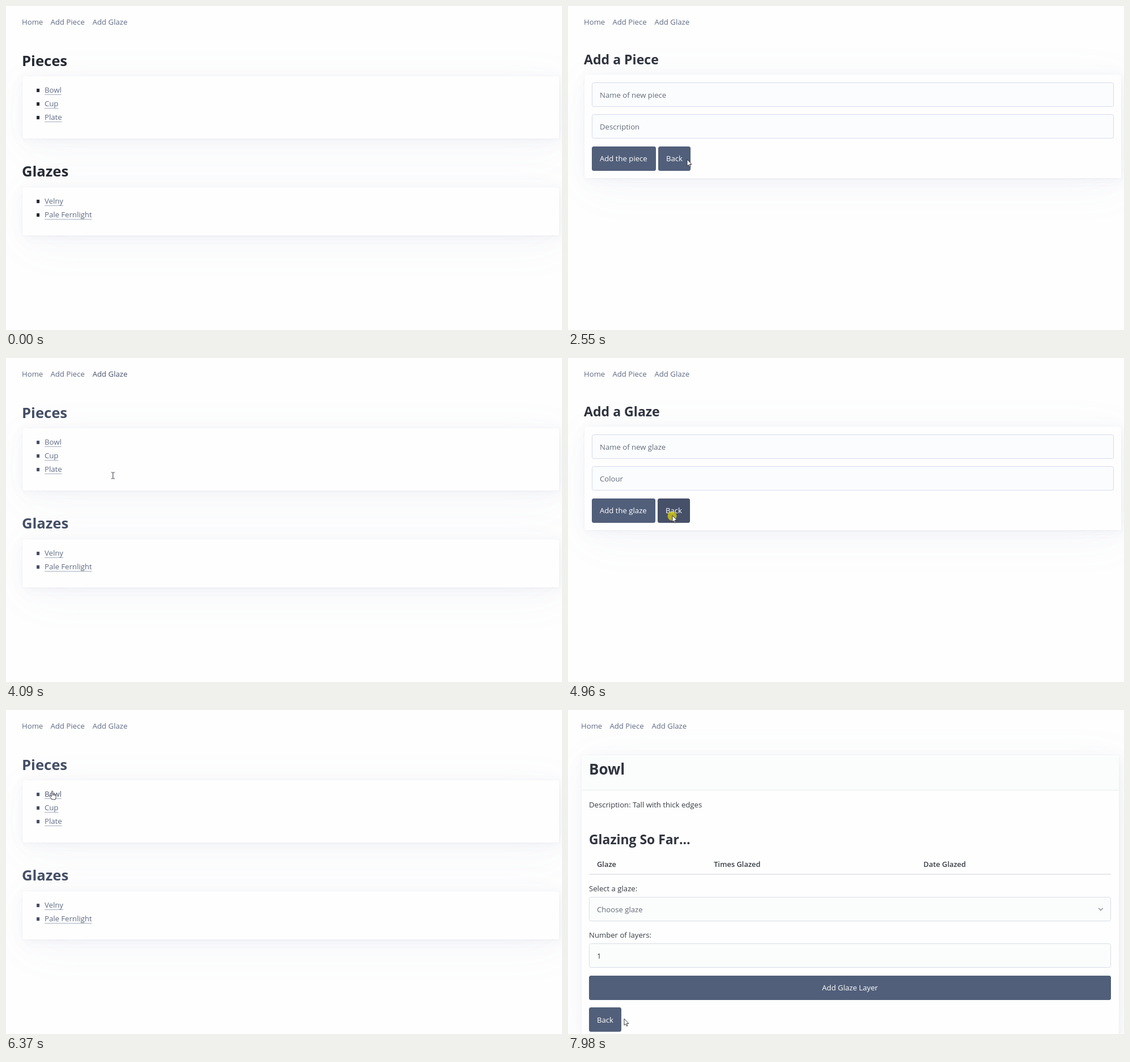
Animation, 980 px wide and 572 px high, one loop 8000 ms. Source, as an HTML page:

```html
<!DOCTYPE html>
<html lang="en">
<head>
<meta charset="utf-8">
<title>Pottery glaze log</title>
<style>
  html, body { margin: 0; width: 100%; height: 100%; overflow: hidden; background: #fefefe; }
  #stage { position: relative; width: 980px; height: 572px; overflow: hidden; font-family: "Open Sans", "Noto Sans", sans-serif; color: #373c44; }
  .page { position: absolute; inset: 0; visibility: hidden; }
  .page *, #pointer { position: absolute; box-sizing: border-box; }
  .text { white-space: pre; line-height: normal; }
  .link { color: #5f6b84; text-underline-offset: 2px; text-decoration-thickness: 1px; }
  .item { text-decoration: underline #a4acbd; text-underline-offset: 3px; }
  .link.hover { color: #465169; text-decoration: underline; text-decoration-thickness: 1px; text-underline-offset: 2px; }
  .link.pressed { color: #465169; }
  .title, .heading { font-weight: 700; color: #30343f; }
  #home .title { color: var(--ink); }
  .bullet { background: var(--ink); }
  .label { font-weight: 600; }
  .hint { color: #646b79; }
  .light { color: #fff; }
  .card { --c: 129, 145, 181; border-radius: 3.5px; background: #fefefe; box-shadow:
    .2px .4px 2.4px rgba(var(--c), .017), .5px .9px 5.6px rgba(var(--c), .024),
    .9px 1.7px 10.4px rgba(var(--c), .03), 1.6px 3.1px 18.8px rgba(var(--c), .036),
    2.9px 5.8px 34.8px rgba(var(--c), .043), 7px 14px 83px rgba(var(--c), .06),
    0 0 0 .9px rgba(var(--c), .015); }
  .head { background: #fbfdfc; border-bottom: 1px solid #e8edf0; border-radius: 3.5px 3.5px 0 0; }
  .field { background: #fbfcfe; border: 1px solid #d5daea; border-radius: 3.5px; }
  #bowl .field { background: #fbfdfc; border-color: #d8dee6; }
  .button { border-radius: 3.5px; background: color-mix(in srgb, #475069 var(--hover, 0%), #515f7a); }
  .rule { background: #e5e7ec; }
  #pointer { inset: 0; }
</style>
</head>
<body>
<div id="stage">
  <div class="page" id="home"></div>
  <div class="page" id="piece"></div>
  <div class="page" id="glaze"></div>
  <div class="page" id="bowl"></div>
  <svg id="pointer" width="980" height="572" fill="none" stroke="#24262c" stroke-width=".9" stroke-linejoin="round">
    <g id="spot">
      <circle id="ring" cx="-.5" cy="1" r="8" fill="#eee100" fill-opacity=".68" stroke="none"/>
      <path id="arrow" fill="#fff" d="M0 0V11.6L2.6 9.2 4.4 13.2 6.1 12.4 4.3 8.5H8Z"/>
      <path id="beam" d="M-3-5.5H-.7L0-5 .7-5.5H3M0-5V5M-3 5.5H-.7L0 5 .7 5.5H3"/>
      <g id="hand" transform="translate(-1.2)">
        <path fill="#fff" d="M0 9.8V1.2A1.2 1.2 0 0 1 2.4 1.2V5.6Q3.5 4.8 4.4 5.9 5.6 5.4 6.3 6.4 7.8 6.2 7.8 7.7V10.5Q7.8 12.5 6.6 15H.5Q-.5 13-3.4 9.6C-4 8.2-2.5 7.6-1.5 8.5Z"/>
        <path d="M2.4 5.6V8M4.4 6V8.1M6.3 6.4V8.4"/>
      </g>
    </g>
  </svg>
</div>
<script>
const LOOP = 8000, ASCENT = 1.069;
const $ = id => document.getElementById(id);

function add(page, className, style, content = '') {
  const el = document.createElement('div');
  el.className = className;
  el.textContent = content;
  Object.assign(el.style, style);
  $(page).append(el);
  return el;
}

function box(page, className, x, y, w, h) {
  return add(page, className, { left: x + 'px', top: y + 'px', width: w + 'px', height: h + 'px' });
}

// y is the baseline of the text
function text(page, className, x, y, content, size = 13.15) {
  const top = y - Math.round(ASCENT * size);
  return add(page, 'text ' + className, { left: x + 'px', top: top + 'px', fontSize: size + 'px' }, content);
}

function nav(page, x) {
  return [['Home', 0], ['Add Piece', 50.5], ['Add Glaze', 124.5]]
    .map(([name, dx]) => text(page, 'link', x + dx, 33, name));
}

function list(page, title, titleY, cardY, cardH, names) {
  text(page, 'title', 28, titleY, title, 25.6);
  box(page, 'card', 28.5, cardY, 946.5, cardH);
  return names.map((name, i) => {
    const y = cardY + 29 + i * 24;
    box(page, 'bullet', 53.5, y - 7, 5.5, 5.5);
    return text(page, 'link item', 68, y, name);
  });
}

function form(page, noun, second, addWidth) {
  nav(page, 28);
  text(page, 'heading', 28, 103, 'Add a ' + noun, 23.1);
  box(page, 'card', 28.5, 121, 946.5, 183);
  box(page, 'field', 41.5, 134.5, 920.5, 43);
  box(page, 'field', 41.5, 191, 920.5, 43);
  text(page, 'hint', 56, 162, 'Name of new ' + noun.toLowerCase());
  text(page, 'hint', 56, 218, second);
  box(page, 'button', 42, 248, addWidth, 42.5);
  text(page, 'light', 56, 274, 'Add the ' + noun.toLowerCase());
  const backX = 42 + addWidth + 4;
  const back = box(page, 'button', backX, 248, 56.5, 42.5);
  text(page, 'light', backX + 14, 274, 'Back');
  return back;
}

const [, addPiece, addGlaze] = nav('home', 28);
const [bowlLink] = list('home', 'Pieces', 106, 124, 110, ['Bowl', 'Cup', 'Plate']);
list('home', 'Glazes', 301, 320, 85, ['Velny', 'Pale Fernlight']);
const pieceBack = form('piece', 'Piece', 'Description', 113);
const glazeBack = form('glaze', 'Glaze', 'Colour', 112);

nav('bowl', 23);
box('bowl', 'card', 23.5, 80, 947.5, 502);
box('bowl', 'head', 23.5, 80, 947.5, 62);
text('bowl', 'title', 37, 114, 'Bowl', 26);
text('bowl', '', 37, 172, 'Description: Tall with thick edges');
text('bowl', 'heading', 37, 237, 'Glazing So Far...', 22.9);
[['Glaze', 51], ['Times Glazed', 257], ['Date Glazed', 626.5]]
  .forEach(([name, x]) => text('bowl', 'label', x, 277, name, 12.9));
box('bowl', 'rule', 37, 289, 920, 2);
text('bowl', '', 37, 320, 'Select a glaze:');
box('bowl', 'field', 37, 330, 920, 43);
text('bowl', 'hint', 51, 357, 'Choose glaze');
box('bowl', '', 936, 346.5, 6, 6).style.cssText +=
  'border: solid #646b79; border-width: 0 1.2px 1.2px 0; transform: rotate(45deg)';
text('bowl', '', 37, 402, 'Number of layers:');
box('bowl', 'field', 37, 412, 920, 43);
text('bowl', '', 51, 439, '1');
box('bowl', 'button', 37, 469, 920, 42.5);
text('bowl', 'light', 497, 495, 'Add Glaze Layer').style.transform = 'translateX(-50%)';
box('bowl', 'button', 37, 525, 56.5, 42.5);
text('bowl', 'light', 51, 552, 'Back');

const pages = [[0, 'home'], [1900, 'piece'], [3000, 'home'], [4160, 'glaze'], [5320, 'home'], [6960, 'bowl']];
const shapes = [[0, ''], [70, 'arrow'], [790, 'beam'], [1040, 'arrow'], [1130, 'hand'], [1900, 'arrow'],
  [3330, 'hand'], [3840, 'arrow'], [3960, 'beam'], [4240, 'arrow'], [6260, 'hand'], [6960, 'arrow']];
const clicks = [[1600, 1750], [2780, 2930], [3560, 3700], [4900, 5100], [6560, 6700]];
const path = [[70, 891, 534], [870, 88, 100], [940, 88, 100], [1270, 97.5, 44], [1740, 98, 43], [1950, 98, 43],
  [2550, 210, 271], [2750, 203, 270], [2930, 203, 270], [3420, 186, 38], [3760, 186, 36], [4203, 189, 240],
  [4290, 189, 240], [4500, 186, 286], [4850, 184, 278], [5330, 184, 278], [6030, 127, 159],
  [6340, 81.5, 143], [7000, 81.5, 143], [7710, 537, 487], [7980, 99, 545]];

const during = (t, from, to) => t >= from && t < to;
const current = (steps, t) => steps.findLast(([start]) => t >= start)[1];
const clamp = v => Math.min(1, Math.max(0, v));

function position(t) {
  const i = Math.max(0, path.findLastIndex(([start]) => t >= start));
  const [t0, x0, y0] = path[i], [t1, x1, y1] = path[i + 1] || [LOOP, x0, y0];
  const p = clamp((t - t0) / (t1 - t0)), ease = p * p * (3 - 2 * p);
  return [x0 + (x1 - x0) * ease, y0 + (y1 - y0) * ease];
}

function render(t) {
  const page = current(pages, t), shape = current(shapes, t);
  for (const el of document.querySelectorAll('.page')) el.style.visibility = el.id === page ? 'visible' : 'hidden';
  $('home').style.setProperty('--ink', t < 1900 ? '#272b34' : '#454f66');
  addPiece.classList.toggle('hover', during(t, 1130, 1900));
  addGlaze.classList.toggle('hover', during(t, 3330, 3840));
  addGlaze.classList.toggle('pressed', during(t, 3840, 4160));
  bowlLink.classList.toggle('pressed', during(t, 6260, 6960));
  for (const [button, start] of [[pieceBack, 2560], [glazeBack, 4330]])
    button.style.setProperty('--hover', clamp((t - start) / 200) * 100 + '%');
  for (const id of ['arrow', 'beam', 'hand']) $(id).style.display = id === shape ? '' : 'none';
  $('ring').style.display = clicks.some(([from, to]) => during(t, from, to)) ? '' : 'none';
  $('spot').setAttribute('transform', `translate(${position(t)})`);
}

const start = performance.now();
function tick() {
  render((performance.now() - start) % LOOP);
  requestAnimationFrame(tick);
}
tick();
</script>
</body>
</html>
```
